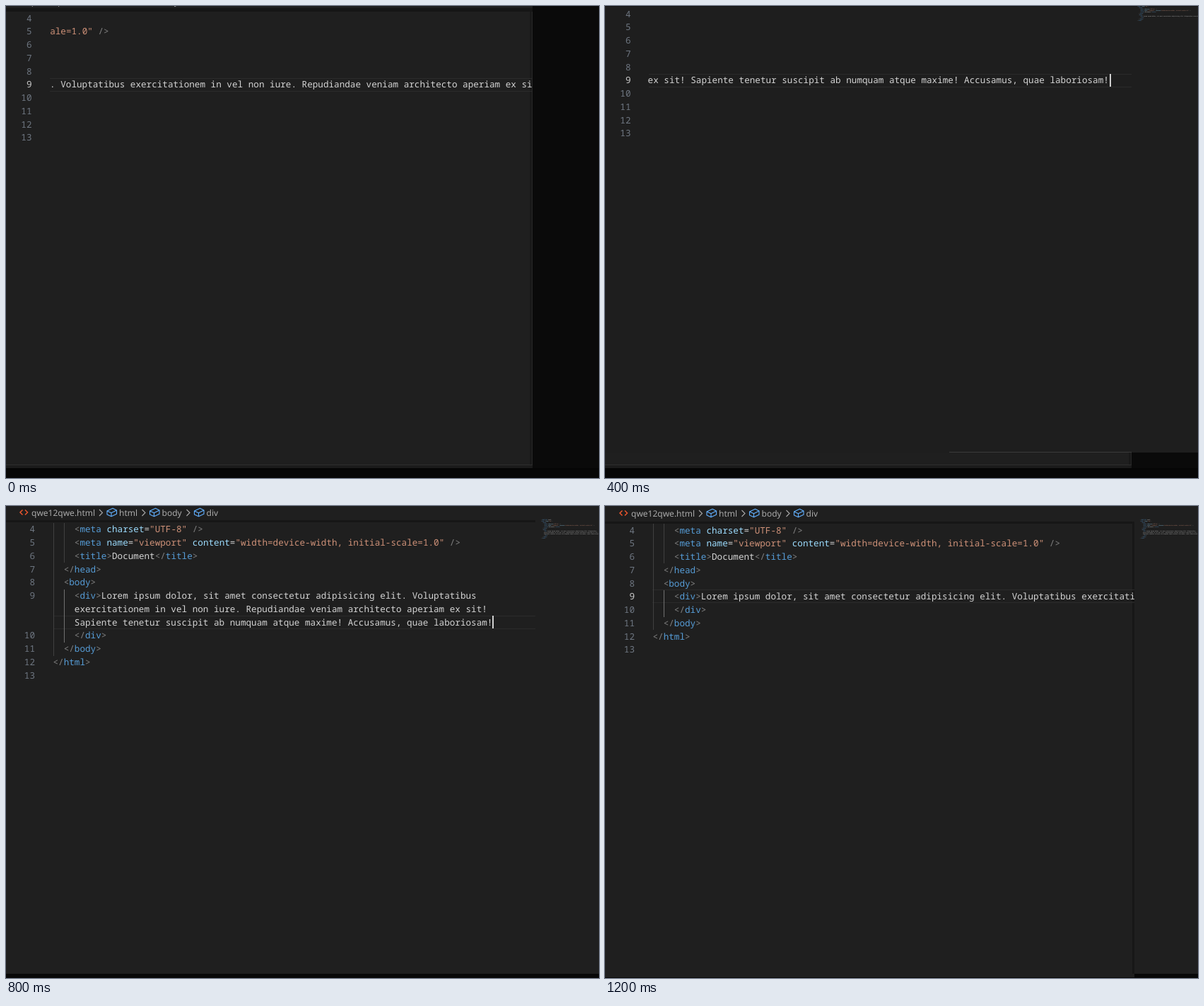
These frames come from a looping animation (839x667 px, 1.6 s). An HTML page:

```html
<!DOCTYPE html>
<html lang="en">
<head>
<meta charset="utf-8">
<title>Word wrap toggle</title>
<style>
  html, body { margin: 0; width: 100%; height: 100%; overflow: hidden; background: #0a0a0a; }
  body { position: relative; text-rendering: geometricPrecision; }
  .scene, .scene div, .scene svg { position: absolute; }
  .scene { inset: 0; overflow: hidden; opacity: 0; animation: show 1600ms step-end infinite; }
  @keyframes show { 0% { opacity: 1; } 25%, 100% { opacity: 0; } }
  .code { font: 12.65px/18.75px "Noto Sans Mono", monospace; white-space: pre; color: #d4d4d4; }
  .clip { top: 0; bottom: 0; overflow: hidden; }
  .numbers { text-align: right; color: #6e7681; left: 0; }
  .numbers .on { color: #ccc; }
  .minimap { font-size: 1.667px; line-height: 2px; }
  .bracket { color: #808080; }
  .tag { color: #569cd6; }
  .attr { color: #9cdcfe; }
  .value { color: #ce9178; }
  .crumbs { left: 0; top: 0; overflow: visible; font: 12px "Noto Sans", sans-serif; fill: #a9a9a9; }
  .crumbs path { fill: none; stroke-width: 1.1; stroke: #a9a9a9; }
  .crumbs .cube { stroke: #62b0ff; stroke-linejoin: round; }
  .crumbs .file { stroke: #e8552d; stroke-width: 1.5; }
</style>
</head>
<body>
<script>
const ROW = 18.75, CHAR = 7.59, PERIOD = 1600, BG = '#1f1f1f';

const lorem = [
  'Lorem ipsum dolor, sit amet consectetur adipisicing elit. Voluptatibus',
  'exercitationem in vel non iure. Repudiandae veniam architecto aperiam ex sit!',
  'Sapiente tenetur suscipit ab numquam atque maxime! Accusamus, quae laboriosam!'
];
const head = [
  '<!DOCTYPE html>', '<html lang="en">', '  <head>', '    <meta charset="UTF-8" />',
  '    <meta name="viewport" content="width=device-width, initial-scale=1.0" />',
  '    <title>Document</title>', '  </head>', '  <body>'
];
const tail = ['    </div>', '  </body>', '</html>', ''];
const longRows = [...head, '    <div>' + lorem.join(' '), ...tail];
const wrappedRows = [...head, '    <div>' + lorem[0], '    ' + lorem[1], '    ' + lorem[2], ...tail];

const span = (name, text) => `<span class="${name}">${text}</span>`;
const box = (x, y, w, h, fill) =>
  `<div style="left:${x}px;top:${y}px;width:${w}px;height:${h}px;background:${fill}"></div>`;

const paintAttrs = text => text.replace(/(\w+)=(".*?")/g,
  (_, name, value) => span('attr', name) + '=' + span('value', value));
const paint = line => line.replace(/<([\/!]?)(\w+)([^>]*?)( ?\/)?>/g,
  (_, open, name, attrs, close = '') => span('bracket', '&lt;' + open) + span('tag', name) +
    paintAttrs(attrs) + span('bracket', close + '&gt;'));
const paintAll = rows => rows.map(paint).join('\n');

function code({ rows, top, left, right, x, scroll = 0, numbersRight, active }) {
  let number = 3;
  const visible = rows.slice(3);
  const numbers = visible.map(row => {
    if (lorem.slice(1).includes(row.trim())) return '';
    number++;
    return number === active ? span('on', number) : number;
  }).join('\n');
  return `<div class="code numbers" style="top:${top - .4}px;width:${numbersRight}px">${numbers}</div>
    <div class="clip" style="left:${left}px;width:${right - left}px">
      <div class="code" style="top:${top - .4}px;left:${x - left - scroll * CHAR}px">${paintAll(visible)}</div>
    </div>`;
}

const activeRow = (x, y, right) =>
  box(x, y, right - x, 1, '#2b2b2b') + box(x, y + 18, right - x, 1, '#2b2b2b');

const minimap = (rows, x, y) =>
  `<div class="code minimap" style="left:${x}px;top:${y}px">${paintAll(rows)}</div>`;

// Vertical indent lines; the innermost block around the cursor is brighter.
const guides = (x, y, textRows) => [
  [0, 0, 7 + textRows, '#404040'], [15, 0, 3, '#404040'], [15, 5, textRows + 1, '#707070']
].map(([dx, row, count, fill]) =>
  box(x + dx, Math.round(y + row * ROW), 1, Math.round(count * ROW), fill)).join('');

function crumbs(dx, dy) {
  const items = [[160, 'html'], [220.5, 'body'], [283.5, 'div']].map(([x, label]) => `
    <path d="M${x - 28} 5l4.5 4.5-4.5 4.5"/>
    <path class="cube" transform="translate(${x - 18} 1)"
      d="M1 6L9 2.2 14.5 5v5.2L7 13.8 1 11zL7 8.8 14.5 5M7 8.8v5"/>
    <text x="${x}" y="13.5">${label}</text>`).join('');
  return `<svg class="crumbs" width="839" height="20"><g transform="translate(${dx} ${dy})">
    <path class="file" d="M23.5 5.5L20 9l3.5 3.5M27 5.5L30.5 9 27 12.5"/>
    <text x="36" y="13.5">qwe12qwe.html</text>${items}</g></svg>`;
}

const lowerEdge = box(0, 653, 839, 14, '#060606') + box(0, 648, 745, 1, '#2e2e2e') +
  box(0, 649, 745, 4, '#1b1b1b');
const scrollEdge = (y, h) => box(741, y, 4, h, '#191919') + box(744, y, 1, h, '#272727');

const scrolled = box(0, 0, 745, 653, BG) + lowerEdge + box(0, 3, 745, 5, '#161616') +
  scrollEdge(8, 640) + crumbs(-4.5, -16) + activeRow(62, 102, 745) +
  code({ rows: longRows, top: 8, left: 62, right: 745, x: 62.4, scroll: 65, numbersRight: 36.5, active: 9 });

const lineEnd = box(0, 0, 839, 631, '#1e1e1e') + box(0, 631, 745, 22, BG) + lowerEdge +
  scrollEdge(631, 17) + box(487, 630, 258, 1, '#3a3a3a') + box(0, 0, 839, 1, '#141414') +
  activeRow(62, 96, 745) + minimap(longRows, 753, -2) +
  code({ rows: longRows, top: 2, left: 61, right: 745, x: 61.4, scroll: 150, numbersRight: 36.5, active: 9 }) +
  box(714, 96, 1.5, 18, '#d0d0d0');

const sidebarMap = minimap(wrappedRows, 757, 19);

const wrapped = box(0, 0, 839, 661, BG) + box(0, 661, 839, 6, '#080808') +
  box(0, 20, 749, 3, '#161616') + crumbs(0, 0) + activeRow(67, 155, 749) +
  guides(67, 23.75, 3) + sidebarMap +
  code({ rows: wrappedRows, top: 23.75, left: 62, right: 749, x: 66.5, numbersRight: 41 }) +
  box(688, 155, 1.5, 18, '#d0d0d0');

const unwrapped = box(0, 0, 839, 666, BG) + box(749, 661, 90, 6, '#080808') +
  box(0, 666, 749, 1, '#080808') + box(0, 22, 749, 3, '#161616') +
  box(746, 22, 3, 639, '#171717') + crumbs(1, 1) + activeRow(67, 118, 749) +
  guides(68, 25, 1) + sidebarMap +
  code({ rows: longRows, top: 25, left: 62, right: 749, x: 67.5, numbersRight: 42, active: 9 });

const scenes = [scrolled, lineEnd, wrapped, unwrapped];
document.body.innerHTML = scenes.map((content, i) =>
  `<div class="scene" style="animation-delay:${i * PERIOD / scenes.length - PERIOD}ms">${content}</div>`).join('');
</script>
</body>
</html>
```
